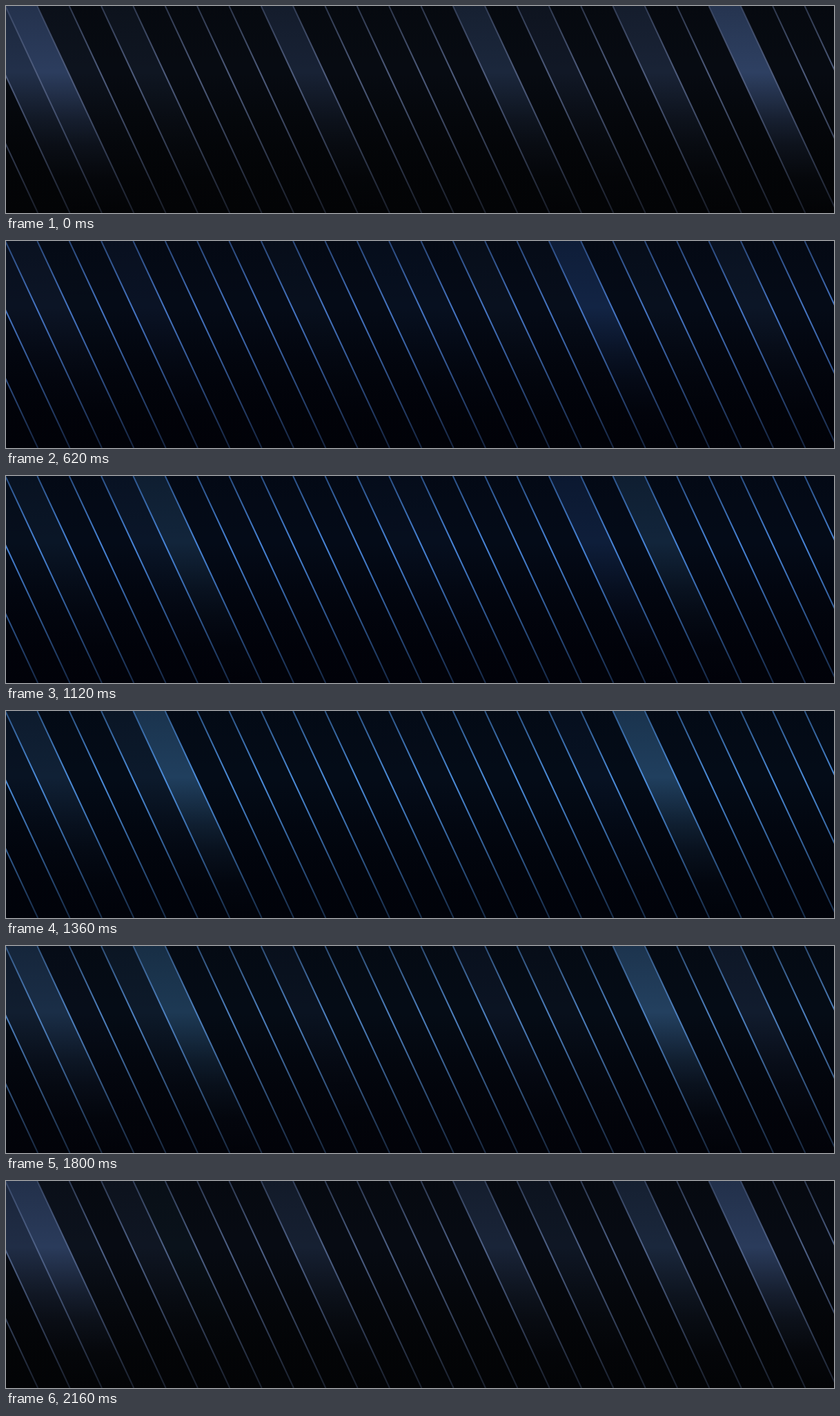
These frames come from a looping animation (1200 by 300 pixels, 2.22 s). An HTML page with a canvas:

```html
<!DOCTYPE html>
<html lang="en">
<head>
<meta charset="utf-8">
<title>Slanted light bars</title>
<style>
  html, body { margin: 0; height: 100%; overflow: hidden; background: #000; }
  canvas { display: block; width: 100vw; height: 100vh; }
</style>
</head>
<body>
<canvas width="1200" height="300"></canvas>
<script>
const WIDTH = 1200, HEIGHT = 300;
const ctx = document.querySelector('canvas').getContext('2d');

// Bars are 42px wide and lean 25 degrees; bar 0 starts at the top left corner.
const ANGLE = 25 * Math.PI / 180;
const PITCH = 42 / Math.cos(ANGLE);
const SHIFT = HEIGHT * Math.tan(ANGLE);
const FIRST_BAR = -3, LAST_BAR = 25;
const edgeX = bar => bar * PITCH - 1;

// Every bar has the haze colour; lit bars move towards the tint by the given share.
const scenes = [
  { floor: [3, 4, 6], haze: [7, 11, 18], tint: [46, 64, 98], line: [78, 92, 125],
    lit: { '-1': .7, 0: .95, 1: .15, 3: .2, 8: .44, 14: .52, 16: .25, 19: .45, 22: 1 } },
  { floor: [1, 2, 9], haze: [4, 11, 24], tint: [21, 42, 80], line: [68, 125, 215],
    lit: { 3: .25, 11: .2, 12: .2, 17: 1 } },
  { floor: [1, 3, 10], haze: [4, 12, 24], tint: [39, 76, 112], line: [78, 145, 220],
    lit: { '-1': .15, 0: .42, 3: .25, 4: 1, 19: 1 } }
];

// [height fraction, opacity]
const shadeStops = [[0, .2], [.32, 0], [.42, .23], [.55, .54], [.67, .76], [.83, .94], [1, 1]];
const lineStops = [[0, .55], [.33, 1], [.65, .66], [1, .3]];

const SCENE_MS = 740, HOLD_MS = 200, STEP_MS = 60, STEPS = 10;

const mix = (a, b, p) => a.map((v, i) => v + (b[i] - v) * p);
const rgba = (color, alpha = 1) => `rgba(${color.map(Math.round)},${alpha})`;
const barColor = (scene, bar) => mix(scene.haze, scene.tint, scene.lit[bar] || 0);

function verticalFade(color, stops) {
  const gradient = ctx.createLinearGradient(0, 0, 0, HEIGHT);
  for (const [at, alpha] of stops) gradient.addColorStop(at, rgba(color, alpha));
  return gradient;
}

function draw(from, to, p) {
  // Each bar paints everything to its right, so no seams show.
  for (let bar = FIRST_BAR; bar <= LAST_BAR; bar++) {
    const x = edgeX(bar);
    ctx.fillStyle = rgba(mix(barColor(from, bar), barColor(to, bar), p));
    ctx.beginPath();
    ctx.moveTo(x, 0);
    ctx.lineTo(WIDTH + SHIFT, 0);
    ctx.lineTo(WIDTH + SHIFT, HEIGHT);
    ctx.lineTo(x + SHIFT, HEIGHT);
    ctx.fill();
  }

  ctx.fillStyle = verticalFade(mix(from.floor, to.floor, p), shadeStops);
  ctx.fillRect(0, 0, WIDTH, HEIGHT);

  ctx.strokeStyle = verticalFade(mix(from.line, to.line, p), lineStops);
  ctx.lineWidth = 2;
  ctx.beginPath();
  for (let bar = FIRST_BAR; bar <= LAST_BAR; bar++) {
    ctx.moveTo(edgeX(bar), 0);
    ctx.lineTo(edgeX(bar) + SHIFT, HEIGHT);
  }
  ctx.stroke();
}

const start = performance.now();

function frame() {
  const time = (performance.now() - start) % (SCENE_MS * scenes.length);
  const index = Math.floor(time / SCENE_MS);
  const local = time % SCENE_MS;
  const step = local < HOLD_MS ? 0 : Math.floor((local - HOLD_MS) / STEP_MS) + 1;
  draw(scenes[index], scenes[(index + 1) % scenes.length], step / STEPS);
  requestAnimationFrame(frame);
}
frame();
</script>
</body>
</html>
```
